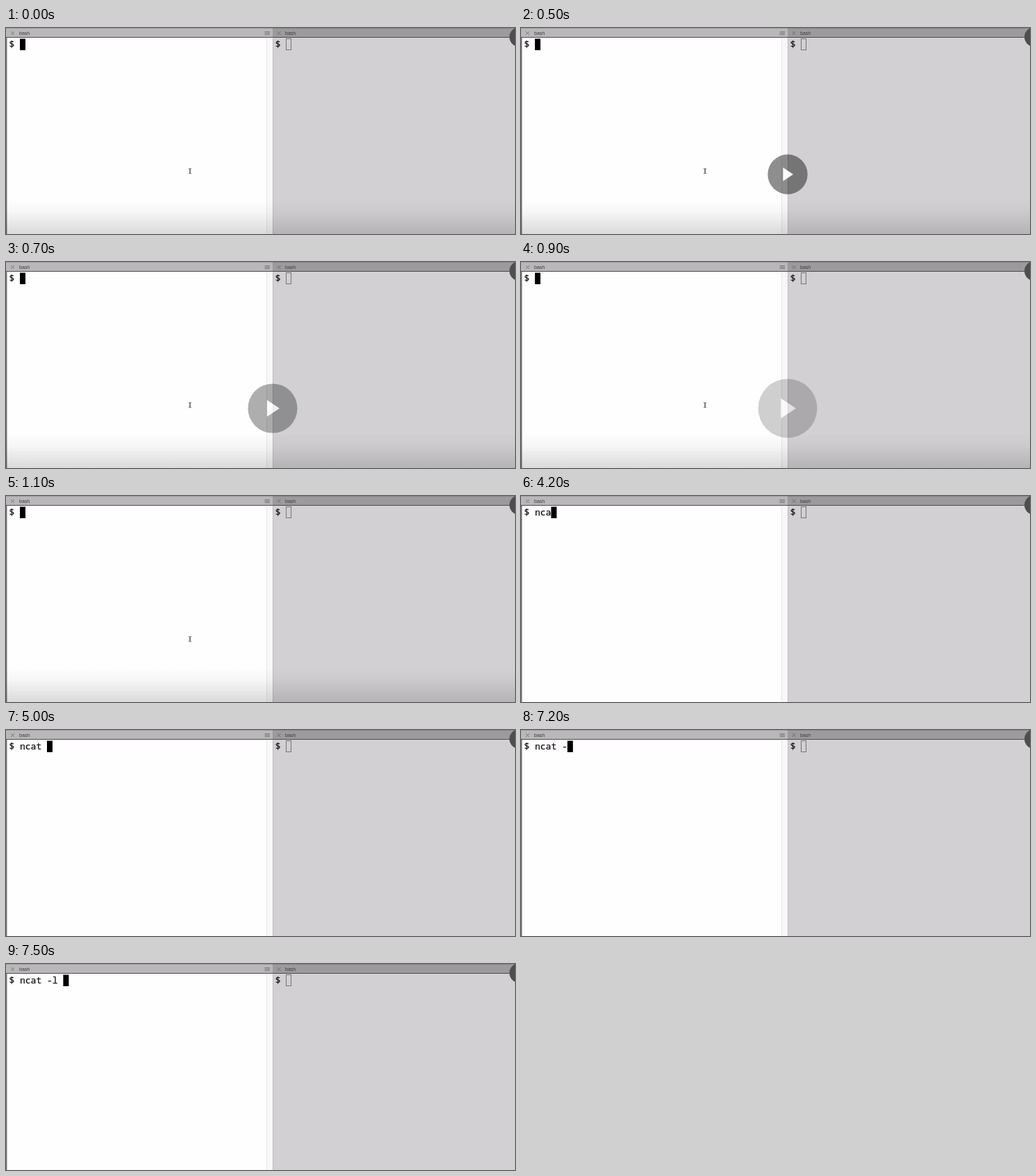
An HTML page for the animation above (8000 ms loop, 733 by 297 pixels).

```html
<!DOCTYPE html>
<html lang="en">
<head>
<meta charset="utf-8">
<title>Two terminals</title>
<style>
html, body { margin: 0; width: 100%; height: 100%; overflow: hidden; background: #fefefe; }
svg { display: block; width: 100vw; height: 100vh; }
.tab { font: 7px "Liberation Sans", Arial, sans-serif; fill: #3c3a3c; }
.term { font: 500 13px "Noto Sans Mono", "DejaVu Sans Mono", monospace; fill: #111; stroke: #111; stroke-width: .25; white-space: pre; }
.line { fill: none; stroke: #666; stroke-width: .8; }
</style>
</head>
<body>
<svg viewBox="0 0 733 297" preserveAspectRatio="none">
  <defs>
    <linearGradient id="shade" x1="0" y1="0" x2="0" y2="1">
      <stop offset="0" stop-opacity="0"/>
      <stop offset=".35" stop-opacity=".03"/>
      <stop offset="1" stop-opacity=".14"/>
    </linearGradient>
  </defs>

  <!-- panes -->
  <rect width="733" height="297" fill="#fefefe"/>
  <rect x="375" y="14" width="9" height="283" fill="#f8f8f8"/>
  <rect x="375" y="14" width="1" height="283" fill="#e6e6e6"/>
  <rect x="384" width="349" height="297" fill="#d2d0d3"/>
  <rect x="384" y="14" width="1" height="283" fill="#bdbbbd"/>

  <!-- title bars -->
  <rect width="384" height="13" fill="#b9b7b9"/>
  <rect x="384" width="349" height="13" fill="#9c9a9c"/>
  <rect width="733" height="1" fill="#000" opacity=".14"/>
  <rect y="13" width="733" height="1" fill="#4c4a4c"/>
  <rect y="14" width="1.4" height="283" fill="#6c6a6c"/>
  <path class="line" d="M7 5l5 5m0-5l-5 5M390.500 5l5 5m0-5l-5 5"/>
  <path class="line" d="M372.500 5.500h7.500m-7.500 2h7.500m-7.500 2h7.500" stroke="#555"/>
  <text class="tab" x="19" y="10">bash</text>
  <text class="tab" x="402" y="10">bash</text>
  <circle cx="739" cy="13" r="14" fill="#4f4d4f"/>

  <!-- prompts -->
  <text class="term" id="prompt" x="4.400" y="28"></text>
  <rect id="caret" y="15.500" width="8" height="16.500" fill="#000"/>
  <text class="term" x="387.800" y="28">$</text>
  <rect x="403.500" y="15.500" width="7" height="16" fill="none" stroke="#757375"/>

  <path id="mouse" d="M263 202.500q2 0 2 1.500v4.500q0 1.500-2 1.500M267 202.500q-2 0-2 1.500v4.500q0 1.500 2 1.500" fill="none" stroke="#333" stroke-width=".8"/>
  <rect id="fade" y="247" width="733" height="50" fill="url(#shade)"/>

  <g id="play">
    <circle r="1" fill="#000" fill-opacity=".5"/>
    <path d="M-.23-.34L.28 0L-.23 .34z" fill="#fff"/>
  </g>
</svg>
<script>
const LOOP = 8000, STEP = 100, CHAR = 7.8;
const el = id => document.getElementById(id);
const prompt = el('prompt'), caret = el('caret'), mouse = el('mouse');
const fade = el('fade'), play = el('play');

const command = 'ncat -l ';
// [time, characters typed]
const keys = [[0, 0], [3800, 1], [3900, 2], [4200, 3], [4900, 4], [5000, 5], [7200, 6], [7500, 8]];

function draw(ms) {
  const t = Math.floor(ms % LOOP / STEP) * STEP;

  const typed = keys.filter(k => k[0] <= t).pop()[1];
  prompt.textContent = '$ ' + command.slice(0, typed);
  caret.setAttribute('x', 20 + typed * CHAR);
  mouse.style.display = t < 3800 ? '' : 'none';

  const dim = t < 3700 ? 1 : Math.max(0, .45 - (t - 3700) / 400);
  fade.setAttribute('opacity', t < 3900 ? dim : 0);

  // the badge appears, waits a moment, then grows and fades
  const shown = t >= 500 && t < 1100;
  play.style.display = shown ? '' : 'none';
  if (shown) {
    const age = t < 700 ? 0 : t - 500;
    play.setAttribute('transform', `translate(384 211) scale(${28.7 + age * .0345})`);
    play.setAttribute('opacity', .88 - age * .00128);
  }
}

let start;
function tick(now) {
  if (start === undefined) start = now;
  draw(now - start);
  requestAnimationFrame(tick);
}
draw(0);
requestAnimationFrame(tick);
</script>
</body>
</html>
```
